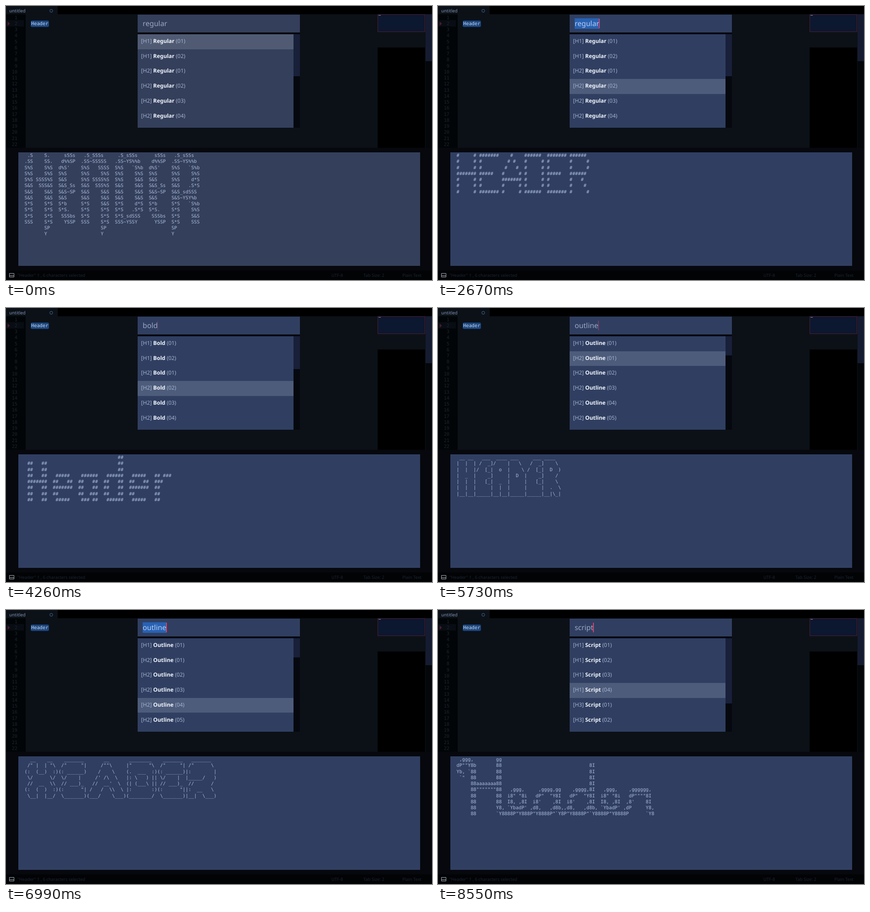
These frames come from a looping animation (932 px wide and 601 px high, 9120 ms). An HTML page:

```html
<!DOCTYPE html>
<html lang="en">
<head>
<meta charset="utf-8">
<title>Header picker</title>
<style>
html, body { margin: 0; width: 100%; height: 100%; overflow: hidden; background: #06080d; }
body { --panel: #303f61; --row: #4e5c7b; position: relative; text-rendering: geometricPrecision;
  font: 9.4px/14px "Noto Sans", sans-serif; }
body div, body svg, pre { position: absolute; margin: 0; white-space: pre; }
pre, .mono { font: 10.28px/13.25px "DejaVu Sans Mono", monospace; }
#tabs { left: 0; top: 0; width: 932px; height: 18px; background: #000; }
#tab { left: 0; top: 0; width: 113px; height: 18px; background: #0c1117; }
#name { left: 7px; top: 3.6px; font-size: 9.8px; color: #7e92b8; }
#editor { left: 0; top: 18px; width: 932px; height: 293px; background: #0c1117; }
#gutter { left: 0; top: 0; width: 43px; height: 293px; background: #020507; }
#line { left: 0; top: 13px; width: 39px; height: 14px; background: #080d14; }
#nums { right: 18px; top: 1.7px; text-align: right; color: #1d242d; }
#word { left: 54px; top: 14px; width: 40px; height: 14px; border-radius: 3px; background: #1b4680; }
#word span { position: absolute; left: 1.3px; top: 1px; color: #cbd8ee; }
#map { left: 813px; top: 0; width: 104px; height: 39px; box-sizing: border-box;
  background: #0c1730; border: 1px solid #541b2f; }
#mark { left: 815px; top: 2px; width: 5px; height: 1px; background: #8b98b4; }
#void { left: 813px; top: 73px; width: 104px; height: 220px; background: #000; }
#track { left: 918px; top: 0; width: 14px; height: 293px; background: #04060a; }
#thumb { left: 918px; top: 0; width: 14px; height: 103px; background: #151c31; }
#input { left: 288px; top: 18.5px; width: 354.5px; height: 39.5px; background: var(--panel); }
#query { left: 11px; top: 8.4px; height: 22px; font-size: 15.7px; line-height: 22px; color: #9aa8c4; }
#query.all span { display: inline-block; height: 22px; background: #2862b4;
  box-shadow: 0 1px #2862b4; color: #b8ccee; }
#caret { right: -1px; top: 1.1px; width: 1.6px; height: 21px; background: #e0406c; }
#gap { left: 288px; top: 58px; width: 354.5px; height: 209px; background: #05080e; }
#list { left: 288px; top: 62px; width: 340.5px; height: 204.5px; overflow: hidden; background: var(--panel); }
#list div { left: 0; width: 333px; height: 32.7px; padding-left: 7.5px;
  font-size: 11.9px; line-height: 30px; color: #a4b3d0; }
#list .on { background: var(--row); }
#list b { color: #f2f6ff; }
#bar { left: 628.5px; top: 62px; width: 14px; background: #18203a; }
#out { left: 26.5px; top: 321px; width: 879px; height: 249px; background: #090c14; }
#page { left: 0; top: 0; width: 879px; height: 249px; background: var(--panel); }
#roll { right: 0; top: 0; width: 14px; height: 187px; background: #19223a; }
#out pre { left: 14px; top: 1px; color: #a9badc; visibility: hidden; }
#foot { left: 0; top: 580px; width: 932px; height: 21px; background: #020305; color: #1d2533; }
#foot div { top: 3.5px; }
</style>
</head>
<body>
<div id="tabs"><div id="tab"></div><div id="name">untitled</div></div>
<div id="editor">
  <div id="gutter"></div><div id="line"></div>
  <div style="left:0;top:0;width:43px"><div id="nums" class="mono"></div></div>
  <div id="word" class="mono"><span>Header</span></div>
  <div id="map"></div><div id="mark"></div><div id="void"></div>
  <div id="track"></div><div id="thumb"></div>
</div>
<div id="gap"></div>
<div id="input"><div id="query"><span></span><div id="caret"></div></div></div>
<div id="list"></div><div id="bar"></div>
<div id="out"><div id="page"></div><div id="roll"></div>
<pre id="regular0">
 .S    S.     sSSs   .S_SSSs     .S_sSSs      sSSs   .S_sSSs
.SS    SS.   d%%SP  .SS~SSSSS   .SS~YS%%b    d%%SP  .SS~YS%%b
S%S    S%S  d%S'    S%S   SSSS  S%S   `S%b  d%S'    S%S   `S%b
S%S    S%S  S%S     S%S    S%S  S%S    S%S  S%S     S%S    S%S
S%S SSSS%S  S&S     S%S SSSS%S  S%S    S&S  S&S     S%S    d*S
S&S  SSS&S  S&S_Ss  S&S  SSS%S  S&S    S&S  S&S_Ss  S&S   .S*S
S&S    S&S  S&S~SP  S&S    S&S  S&S    S&S  S&S~SP  S&S_sdSSS
S&S    S&S  S&S     S&S    S&S  S&S    S&S  S&S     S&S~YSY%b
S*S    S*S  S*b     S*S    S&S  S*S    d*S  S*b     S*S   `S%b
S*S    S*S  S*S.    S*S    S*S  S*S   .S*S  S*S.    S*S    S%S
S*S    S*S   SSSbs  S*S    S*S  S*S_sdSSS    SSSbs  S*S    S&S
SSS    S*S    YSSP  SSS    S*S  SSS~YSSY      YSSP  S*S    SSS
       SP                  SP                       SP
       Y                   Y                        Y</pre>
<pre id="regular1">

88        88                                   88
88        88                                   88
88        88                                   88
88aaaaaaaa88  ,adPPYba, ,adPPYYba,  ,adPPYb,88  ,adPPYba, 8b,dPPYba,
88""""""""88 a8P_____88 ""     `Y8 a8"    `Y88 a8P_____88 88P'   "Y8
88        88 8PP""""""" ,adPPPPP88 8b       88 8PP""""""" 88
88        88 "8b,   ,aa 88,    ,88 "8a,   ,d88 "8b,   ,aa 88
88        88  `"Ybbd8"' `"8bbdP"Y8  `"8bbdP"Y8  `"Ybbd8"' 88</pre>
<pre id="regular2">

 #   #                    #
 #   #                    #
 #   #   ###    ###    ## #   ###   # ##
 #####  #   #      #  #  ##  #   #  ##  #
 #   #  #####   ####  #   #  #####  #
 #   #  #      #   #  #  ##  #      #
 #   #   ###    ####   ## #   ###   #</pre>
<pre id="regular3">
#     # #######    #    ######  ####### ######
#     # #         # #   #     # #       #     #
#     # #        #   #  #     # #       #     #
####### #####   #     # #     # #####   ######
#     # #       ####### #     # #       #   #
#     # #       #     # #     # #       #    #
#     # ####### #     # ######  ####### #     #</pre>
<pre id="bold1">

                                                                      dddddddd
HHHHHHHHH     HHHHHHHHH                                               d::::::d
H:::::::H     H:::::::H                                               d::::::d
H:::::::H     H:::::::H                                               d::::::d
HH::::::H     H::::::HH                                               d:::::d
  H:::::H     H:::::H      eeeeeeeeeeee    aaaaaaaaaaaaa      ddddddddd:::::d     eeeeeeeeeeee    rrrrr   rrrrrrrrr
  H:::::H     H:::::H    ee::::::::::::ee  a::::::::::::a   dd::::::::::::::d   ee::::::::::::ee  r::::rrr:::::::::r
  H::::::HHHHH::::::H   e::::::eeeee:::::eeaaaaaaaaa:::::a d::::::::::::::::d  e::::::eeeee:::::eer:::::::::::::::::r
  H:::::::::::::::::H  e::::::e     e:::::e         a::::ad:::::::ddddd:::::d e::::::e     e:::::err::::::rrrrr::::::r
  H:::::::::::::::::H  e:::::::eeeee::::::e  aaaaaaa:::::ad::::::d    d:::::d e:::::::eeeee::::::e r:::::r     r:::::r
  H::::::HHHHH::::::H  e:::::::::::::::::e aa::::::::::::ad:::::d     d:::::d e:::::::::::::::::e  r:::::r     rrrrrrr
  H:::::H     H:::::H  e::::::eeeeeeeeeee a::::aaaa::::::ad:::::d     d:::::d e::::::eeeeeeeeeee   r:::::r
  H:::::H     H:::::H  e:::::::e         a::::a    a:::::ad:::::d     d:::::d e:::::::e            r:::::r
HH::::::H     H::::::HHe::::::::e        a::::a    a:::::ad::::::ddddd::::::dde::::::::e           r:::::r
H:::::::H     H:::::::H e::::::::eeeeeeeea:::::aaaa::::::a d:::::::::::::::::d e::::::::eeeeeeee   r:::::r
H:::::::H     H:::::::H  ee:::::::::::::e a::::::::::aa:::a d:::::::::ddd::::d  ee:::::::::::::e   r:::::r
HHHHHHHHH     HHHHHHHHH    eeeeeeeeeeeeee  aaaaaaaaaa  aaaa  ddddddddd   ddddd    eeeeeeeeeeeeee   rrrrrrr</pre>
<pre id="bold3">
                                 ##
 ##   ##                         ##
 ##   ##                         ##
 ##   ##   #####    ######   ######   #####   ## ###
 #######  ##   ##  ##   ##  ##   ##  ##   ##  ###
 ##   ##  #######  ##   ##  ##   ##  #######  ##
 ##   ##  ##       ##  ###  ##   ##  ##       ##
 ##   ##   #####    ### ##   ######   #####   ##</pre>
<pre id="bold4">
888    888                        888
888    888                        888
888    888                        888
8888888888  .d88b.   8888b.   .d88888  .d88b.  888d888
888    888 d8P  Y8b     "88b d88" 888 d8P  Y8b 888P"
888    888 88888888 .d888888 888  888 88888888 888
888    888 Y8b.     888  888 Y88b 888 Y8b.     888
888    888  "Y8888  "Y888888  "Y88888  "Y8888  888</pre>
<pre id="bold5">
ooooo   ooooo                           .o8
`888'   `888'                          "888
 888     888   .ooooo.   .oooo.    .oooo888   .ooooo.  oooo d8b
 888ooooo888  d88' `88b `P  )88b  d88' `888  d88' `88b `888""8P
 888     888  888ooo888  .oP"888  888   888  888ooo888  888
 888     888  888    .o d8(  888  888   888  888    .o  888
o888o   o888o `Y8bod8P' `Y888""8o `Y8bod88P" `Y8bod8P' d888b</pre>
<pre id="outline1">
 __ __   ___  ____ ___     ___ ____
|  |  | /  _]/    |   \   /  _]    \
|  |  |/  [_|  o  |    \ /  [_|  D  )
|  _  |    _]     |  D  |    _]    /
|  |  |   [_|  _  |     |   [_|    \
|  |  |     |  |  |     |     |  .  \
|__|__|_____|__|__|_____|_____|__|\_|</pre>
<pre id="outline2">
 _    _                _
| |  | |              | |
| |__| | ___  __ _  __| | ___ _ __
|  __  |/ _ \/ _` |/ _` |/ _ \ '__|
| |  | |  __/ (_| | (_| |  __/ |
|_|  |_|\___|\__,_|\__,_|\___|_|</pre>
<pre id="outline3">
 _   _                _
| | | | ___  __ _  __| | ___ _ __
| |_| |/ _ \/ _` |/ _` |/ _ \ '__|
|  _  |  __/ (_| | (_| |  __/ |
|_| |_|\___|\__,_|\__,_|\___|_|</pre>
<pre id="outline4">
  __    __    _______       __       ________    _______   _______
 /" |  | "\  /"     "|     /""\     |"      "\  /"     "| /"      \
(:  (__)  :)(: ______)    /    \    (.  ___  :)(: ______)|:        |
 \/      \/  \/    |     /' /\  \   |: \   ) || \/    |  |_____/   )
 //  __  \\  // ___)_   //  __'  \  (| (___\ || // ___)_  //      /
(:  (  )  :)(:      "| /   /  \\  \ |:       :)(:      "||:  __   \
 \__|  |__/  \_______)(___/    \___)(________/  \_______)|__|  \___)</pre>
<pre id="script0"></pre>
<pre id="script1">
 ,            _
/|   |       | |
 |___|  _  __, __|  _   ,_
 |   \ |/ /  |/  | |/  /  |
 |   |/|_/\_/|\_/|_/|_/   |_/</pre>
<pre id="script2">
    __  __               __
   / / / /__  ____ _____/ /__  _____
  / /_/ / _ \/ __ `/ __  / _ \/ ___/
 / __  /  __/ /_/ / /_/ /  __/ /
/_/ /_/\___/\__,_/\__,_/\___/_/</pre>
<pre id="script3">
 ,ggg,        gg
dP""Y8b       88                               8I
Yb, `88       88                               8I
 `"  88       88                               8I
     88aaaaaaa88                               8I
     88"""""""88   ,ggg,     ,gggg,gg    ,gggg,8I   ,ggg,    ,gggggg,
     88       88  i8" "8i   dP"  "Y8I   dP"  "Y8I  i8" "8i   dP""""8I
     88       88  I8, ,8I  i8'    ,8I  i8'    ,8I  I8, ,8I  ,8'    8I
     88       Y8, `YbadP' ,d8,   ,d8b,,d8,   ,d8b, `YbadP' ,dP     Y8,
     88       `Y8888P"Y888P"Y8888P"`Y8P"Y8888P"`Y8888P"Y8888P      `Y8</pre>
</div>
<div id="foot">
  <div style="left:25px">"Header" 1 , 6 characters selected</div>
  <div style="left:712px">UTF-8</div>
  <div style="left:782px">Tab Size: 2</div>
  <div style="left:867px">Plain Text</div>
</div>
<svg width="932" height="601" fill="none" style="left:0;top:0">
  <circle cx="99" cy="10.5" r="3.2" stroke="#3f6a9c"/>
  <path d="M3.5 34L8.5 38.7L3.5 43.5Z" fill="#4d1a30"/>
  <path d="M7.5 586.5h10v8h-10zM7.5 591.5h10" stroke="#aab2c0"/>
</svg>
<script>
const $ = id => document.getElementById(id);
const LOOP = 9120;

// rows per heading level, then scrollbar thumb height
const lists = {
  regular: [["H1", 2], ["H2", 4], 92],
  bold: [["H1", 2], ["H2", 4], 72],
  outline: [["H1", 1], ["H2", 5], 42],
  script: [["H1", 4], ["H3", 2], 143]
};

// time, list, typed letters, chosen row, query highlighted
const steps = [
  [0, "regular", 7, 0], [1050, "regular", 7, 1], [1830, "regular", 7, 2], [2130, "regular", 7, 3],
  [2670, "regular", 7, 3, 1], [2730, "bold", 1, 0], [2790, "bold", 2, 0], [2850, "bold", 3, 0],
  [2910, "bold", 4, 0], [3030, "bold", 4, 1], [4260, "bold", 4, 3], [4680, "bold", 4, 4],
  [5310, "bold", 4, 5], [5460, "bold", 4, 5, 1], [5520, "outline", 1, 0], [5580, "outline", 3, 0],
  [5640, "outline", 6, 0], [5700, "outline", 7, 0], [5730, "outline", 7, 1], [5970, "outline", 7, 2],
  [6450, "outline", 7, 3], [6810, "outline", 7, 4], [6990, "outline", 7, 4, 1],
  [7290, "script", 4, 0], [7350, "script", 6, 0], [7740, "script", 6, 1],
  [8010, "script", 6, 2], [8310, "script", 6, 3]
];
const aliases = { bold0: "bold4", outline0: "outline3" };
const tall = ["bold1", "script0"];

// time, caret opacity
const blink = [
  [0, 0], [30, 0], [540, .8], [839, .8], [840, 0], [1049, 0], [1050, .8], [1200, .8], [1380, 0],
  [1829, 0], [1830, .5], [1950, .8], [2130, .8], [2490, .1], [2670, .9], [3000, .9], [3090, .2],
  [4259, .2], [4260, .2], [4440, .8], [5010, .8], [5160, 0], [5309, 0], [5310, .8], [5700, .8],
  [5730, .4], [5969, .4], [6150, .8], [6450, .8], [6510, 0], [6659, 0], [6660, .8], [6989, .8],
  [6990, 1], [LOOP, 1]
];

const last = (rows, t) => rows.reduce((n, r, i) => r[0] <= t ? i : n, 0);
const mix = (a, b, k) => `rgb(${a.map((v, i) => v + (b[i] - v) * k)})`;

$("nums").textContent = Array.from({ length: 22 }, (_, i) => i + 1).join("\n");

// double-size slanted lettering
const rows = $("regular2").textContent.trimEnd().split("\n");
$("script0").textContent = rows.flatMap(r => [r, r]).map((r, i, all) =>
  " ".repeat((all.length - i) / 2) + r.replace(/./g, "$&$&").replace(/#/g, "8")).join("\n");

let shown = -1, art = $("regular0");

function show(n) {
  const [, name, typed, chosen, all] = steps[n];
  const [first, second, thumb] = lists[name];
  const title = name[0].toUpperCase() + name.slice(1);
  const items = [first, second].flatMap(([level, count]) =>
    Array.from({ length: count }, (_, i) =>
      `[${level}] <b>${title.slice(0, typed)}</b>${title.slice(typed)} (0${i + 1})`));
  $("list").innerHTML = items.map((text, i) =>
    `<div style="top:${i * 32.7}px" class="${i === chosen ? "on" : ""}">${text}</div>`).join("");
  $("query").firstChild.textContent = name.slice(0, typed);
  $("query").className = all ? "all" : "";
  $("bar").style.height = thumb + "px";

  const key = name + chosen, id = aliases[key] || key;
  art.style.visibility = "hidden";
  art = $(id);
  art.style.visibility = "visible";
  const scroll = tall.includes(id);
  $("page").style.width = (scroll ? 865 : 879) + "px";
  $("roll").style.display = scroll ? "block" : "none";
}

function draw(now) {
  const t = now % LOOP;
  const n = last(steps, t);
  if (n !== shown) show(shown = n);

  const i = Math.min(last(blink, t), blink.length - 2);
  const [[t0, a], [t1, b]] = [blink[i], blink[i + 1]];
  $("caret").style.opacity = a + (b - a) * (t - t0) / (t1 - t0);

  const k = Math.min(1, Math.max(0, (t - 30) / 510));
  document.body.style.setProperty("--panel", mix([52, 63, 91], [48, 63, 97], k));
  document.body.style.setProperty("--row", mix([80, 91, 115], [78, 92, 123], k));
  requestAnimationFrame(draw);
}
draw(0);
requestAnimationFrame(draw);
</script>
</body>
</html>
```
